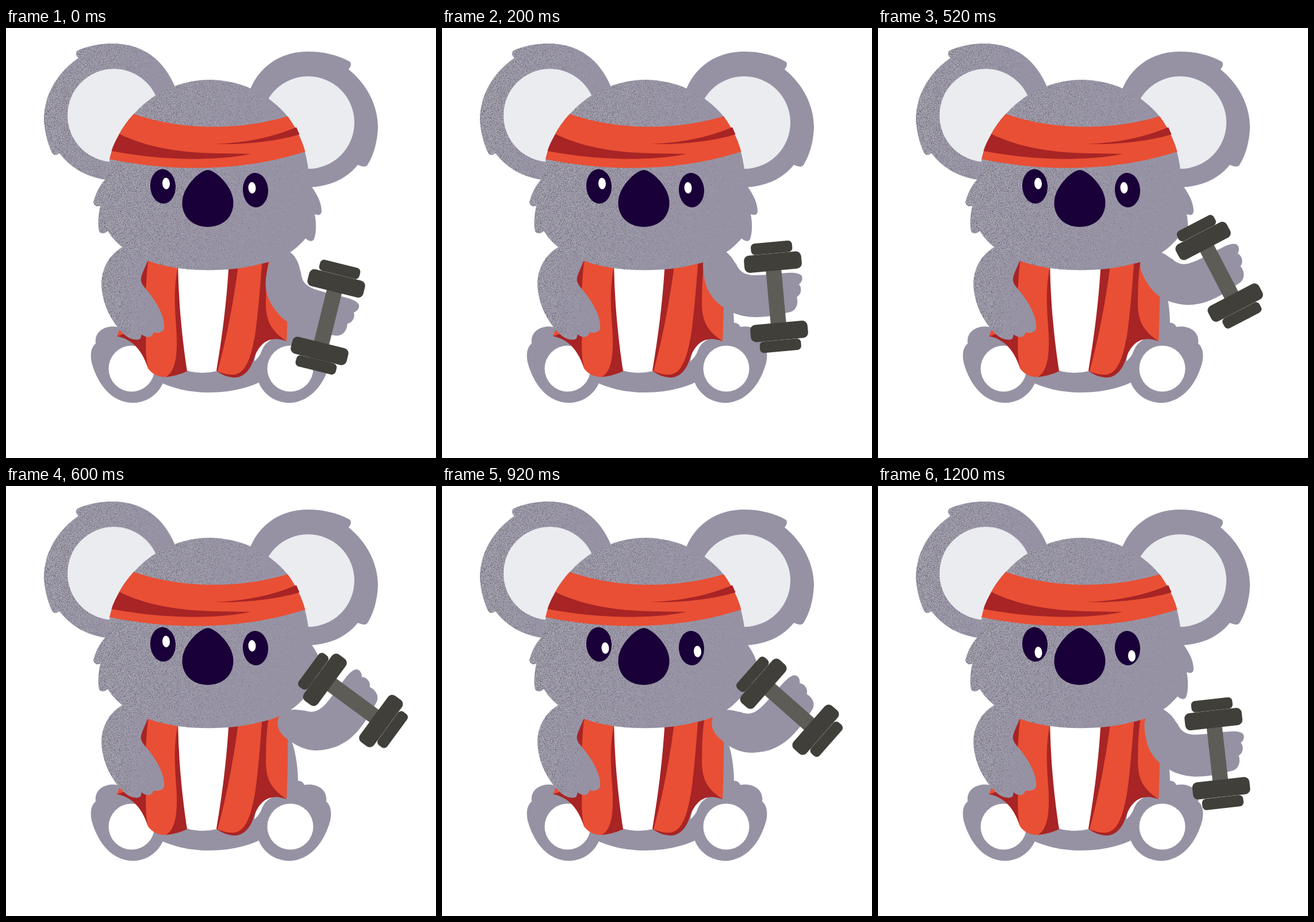
An HTML page for the animation above (1400 ms loop, 748 px wide and 748 px high).

```html
<!DOCTYPE html>
<html lang="en">
<head>
<meta charset="utf-8">
<title>Koala workout</title>
<style>
  html, body { margin: 0; width: 100%; height: 100%; overflow: hidden; background: #fff; }
  svg { display: block; width: 100%; height: 100%; }
  .fur { fill: #9692a4; }
  .pale { fill: #ebecf0; }
  .white { fill: #fff; }
  .red { fill: #e94f34; }
  .fold { fill: #a82425; }
  .ink { fill: #1a0038; }
  .iron { fill: #403f39; }
  .bar { fill: #5e5c56; }
</style>
</head>
<body>
<svg viewBox="0 0 748 748" xmlns="http://www.w3.org/2000/svg">
  <defs>
    <linearGradient id="fade" x1="0" y1="0.3" x2="1" y2="0.5">
      <stop offset="0" stop-color="#000"/>
      <stop offset="0.45" stop-color="#000" stop-opacity="0.8"/>
      <stop offset="1" stop-color="#000" stop-opacity="0.4"/>
    </linearGradient>
    <!-- Speckles grow denser where the fade is more opaque. -->
    <filter id="dark" x="0" y="0" width="1" height="1">
      <feTurbulence type="fractalNoise" baseFrequency="0.77" numOctaves="2" seed="4" result="noise"/>
      <feComposite in="SourceGraphic" in2="noise" operator="arithmetic" k2="0.45" k3="1" k4="-0.97"/>
      <feComponentTransfer result="dots"><feFuncA type="linear" slope="9"/></feComponentTransfer>
      <feFlood flood-color="#63616b"/>
      <feComposite in2="dots" operator="in"/>
    </filter>
    <filter id="light" x="0" y="0" width="1" height="1">
      <feTurbulence type="fractalNoise" baseFrequency="0.77" numOctaves="2" seed="19" result="noise"/>
      <feComposite in="SourceGraphic" in2="noise" operator="arithmetic" k2="0.45" k3="1" k4="-0.94"/>
      <feComponentTransfer result="dots"><feFuncA type="linear" slope="9"/></feComponentTransfer>
      <feFlood flood-color="#b3b1b7"/>
      <feComposite in2="dots" operator="in"/>
    </filter>

    <path id="ear" d="M293 100C272 52 235 27 185 27C160 27 140 32 125 39C120 42 121 48 126 52C90 77 66 115 66 160C67 180 72 200 80 217C84 223 88 221 93 218C113 244 142 260 174 264L250 200Z"/>
    <path id="head" d="M180 230C188 196 202 170 222 150A176 176 0 0 1 490 154C506 176 516 196 520 215C525 235 528 256 529 272L533 278C540 288 549 303 549 319C548 326 543 326 537 324C540 338 540 356 536 367C533 373 527 371 521 366C500 391 475 404 440 411C385 426 300 425 247 405C231 400 215 392 203 382C192 373 184 364 177 353C171 359 165 358 162 354C159 340 161 324 164 309C158 312 153 309 152 303C155 291 162 274 173 263C178 252 180 242 180 230Z"/>
    <path id="restArm" d="M204 380C184 391 166 414 166 446C167 482 186 516 208 535C215 541 228 545 234 540L236 533C243 539 254 540 257 529C264 532 273 529 275 523C277 503 262 476 245 456C234 444 232 438 238 425L247 404Z"/>
    <g id="leg">
      <path class="fur" d="M500 512L511 513C515 514 518 517 519 520C538 516 560 526 557 549C565 555 567 568 564 582C553 622 528 652 491 652C468 651 450 638 441 620C434 600 432 575 445 560L470 530Z"/>
      <circle class="white" cx="494.5" cy="592.5" r="40"/>
    </g>
    <g id="plates" class="iron">
      <rect x="-50" y="-75.5" width="100" height="30" rx="9"/>
      <rect x="-36" y="-95.5" width="72" height="19.8" rx="7"/>
    </g>
  </defs>

  <rect class="white" width="748" height="748"/>

  <g id="ears">
    <use href="#ear" class="fur"/>
    <use href="#ear" fill="url(#fade)" filter="url(#dark)"/>
    <use href="#ear" fill="url(#fade)" filter="url(#light)"/>
    <ellipse class="pale" cx="187.5" cy="152" rx="80.5" ry="81"/>
    <path class="fur" d="M425 106C443 64 480 41 526 41C552 41 577 47 597 58C602 61 600 67 596 72C628 98 647 135 647 173C646 198 640 220 629 238C625 243 620 241 612 238C592 263 563 275 530 277L450 200Z"/>
    <ellipse class="pale" cx="525.5" cy="164.5" rx="80.5" ry="80.5"/>
  </g>

  <g id="body">
    <path class="fur" d="M230 400L470 400C500 430 508 475 508 520C508 590 440 634 354 634C268 634 205 590 205 520C205 475 220 430 230 400Z"/>
    <path class="white" d="M285 400L400 400L378 575L366 597Q340 603 315 596L300 575Z"/>
    <use href="#leg"/>
    <use href="#leg" transform="translate(713 0) scale(-1 1)"/>
    <path class="white" d="M432 580Q442 571 445 561Q450 548 462 542L450 538Q436 550 432 580Z"/>
  </g>

  <g id="vest">
    <path class="red" d="M247 395L299 400C299 470 304 540 315 597Q297 605 278 607C264 607 253 601 247 592C237 562 222 542 193 536L200 519L225 480Z"/>
    <path class="fold" d="M299 415C292 450 293 480 296 520C299 560 297 597 278 607Q298 605 315 597C305 530 301 480 299 415Z"/>
    <path class="fold" d="M248 403C236 425 233 438 234 442L243 454C245 440 244 425 248 403Z"/>
    <path class="fold" d="M193 536Q203 533 211 530L244 520C243 555 242 575 249 596C238 562 222 542 193 536Z"/>
    <path class="fold" d="M388 405L480 395L490 420L488 545C458 533 440 549 431 576C424 597 413 607 399 608C386 608 374 603 366 596C377 530 384 475 388 405Z"/>
    <path class="red" d="M405 405L446 400C442 450 439 495 433 535C428 562 424 578 415 591C404 607 388 605 368 597C384 540 398 465 405 405Z"/>
    <path class="red" d="M458 395L482 395L490 430Q491 480 488 545C462 527 453 512 452 482C453 455 451 440 458 395Z"/>
  </g>

  <path id="arm" class="fur" d="M480 383C488 384 496 390 502 397C507 403 509 408 512 411C517 422 524 430 545 430C565 430 580 427 600 426C611 425 620 426 625 430C628 435 627 441 621 446C626 451 626 463 617 468C620 477 618 490 606 494C592 497 570 503 545 503C531 503 518 500 508 496C502 494 496 490 490 486C478 478 470 469 465 460C458 449 454 428 454 413C454 396 466 383 480 383Z"/>

  <use href="#restArm" class="fur"/>
  <use href="#restArm" fill="url(#fade)" filter="url(#dark)"/>
  <use href="#restArm" fill="url(#fade)" filter="url(#light)"/>

  <g id="face">
    <use href="#head" class="fur"/>
    <use href="#head" fill="url(#fade)" filter="url(#dark)"/>
    <use href="#head" fill="url(#fade)" filter="url(#light)"/>
    <path class="red" d="M222 149.5C305 178 405 179 490 153.5C506 176 515 196 520.5 215C415 250 290 251 180 228C187 198 202 172 222 149.5Z"/>
    <path class="fold" d="M198 184.5C240 206 300 217 365 218L425 219C380 229 290 234 183.500 214Q188 199 198 184.5Z"/>
    <path class="fold" d="M362 202C410 200 460 192 505 172.5L510.5 185C470 197 420 203 362 202Z"/>
    <ellipse class="ink" cx="273" cy="275.5" rx="22" ry="30" transform="rotate(-3 273 275.5)"/>
    <ellipse class="ink" cx="434" cy="282" rx="22" ry="30" transform="rotate(-3 434 282)"/>
    <path class="ink" d="M351 247C364 247 395.5 276 395.5 304C395.5 330 376 346 351 346C326 346 306.5 330 306.5 304C306.5 276 338 247 351 247Z"/>
    <ellipse id="glintL" class="white" rx="6.5" ry="10"/>
    <ellipse id="glintR" class="white" rx="6.5" ry="10"/>
  </g>

  <g id="dumbbell">
    <rect class="bar" x="-13.5" y="-47" width="27" height="94"/>
    <use href="#plates"/>
    <use href="#plates" transform="scale(1 -1)"/>
  </g>
</svg>
<script>
  const STEP = 200;
  const REST = { x: 581, y: 467.5, tilt: -5.2 };

  // Where the eyes look: left glint x, y, then right glint x, y.
  const AHEAD = [278.5, 270.5, 428, 278];
  const ASIDE = [284, 282, 444.5, 288];
  const DOWN = [279, 289.5, 441.5, 295.5];

  // x, y and tilt of the weight; dx, dy is how far the hand shifts along the grip.
  const pose = (x, y, tilt, dx, dy, gaze) => ({ x, y, tilt, dx, dy, gaze });
  const poses = [
    pose(560, 503, 13.9, 0, -1, AHEAD),
    pose(581, 467.5, -5.2, 0, 0, AHEAD),
    pose(593.5, 424, -27.6, 3.5, 3.5, AHEAD),
    pose(603.5, 373, -53.7, 5, 3.5, AHEAD),
    pose(604.5, 384, -48.7, 3.5, 2.5, ASIDE),
    pose(598.5, 418.5, -30.8, 2.5, 2.5, ASIDE),
    pose(590.3, 465.7, -6.4, 1.2, 3.5, DOWN)
  ];

  const el = id => document.getElementById(id);
  const place = (id, value) => el(id).setAttribute("transform", value);

  function draw(p) {
    const turn = p.tilt - REST.tilt;
    const [lx, ly, rx, ry] = p.gaze;
    place("dumbbell", `translate(${p.x} ${p.y}) rotate(${p.tilt})`);
    place("arm", `translate(${p.x + p.dx} ${p.y + p.dy}) rotate(${turn}) translate(${-REST.x} ${-REST.y})`);
    place("glintL", `translate(${lx} ${ly}) rotate(-3)`);
    place("glintR", `translate(${rx} ${ry}) rotate(-3)`);
  }

  const start = performance.now();
  let shown = -1;

  function tick() {
    const elapsed = performance.now() - start;
    const i = Math.floor(elapsed / STEP) % poses.length;
    if (i !== shown) draw(poses[shown = i]);
    requestAnimationFrame(tick);
  }
  tick();
</script>
</body>
</html>
```
